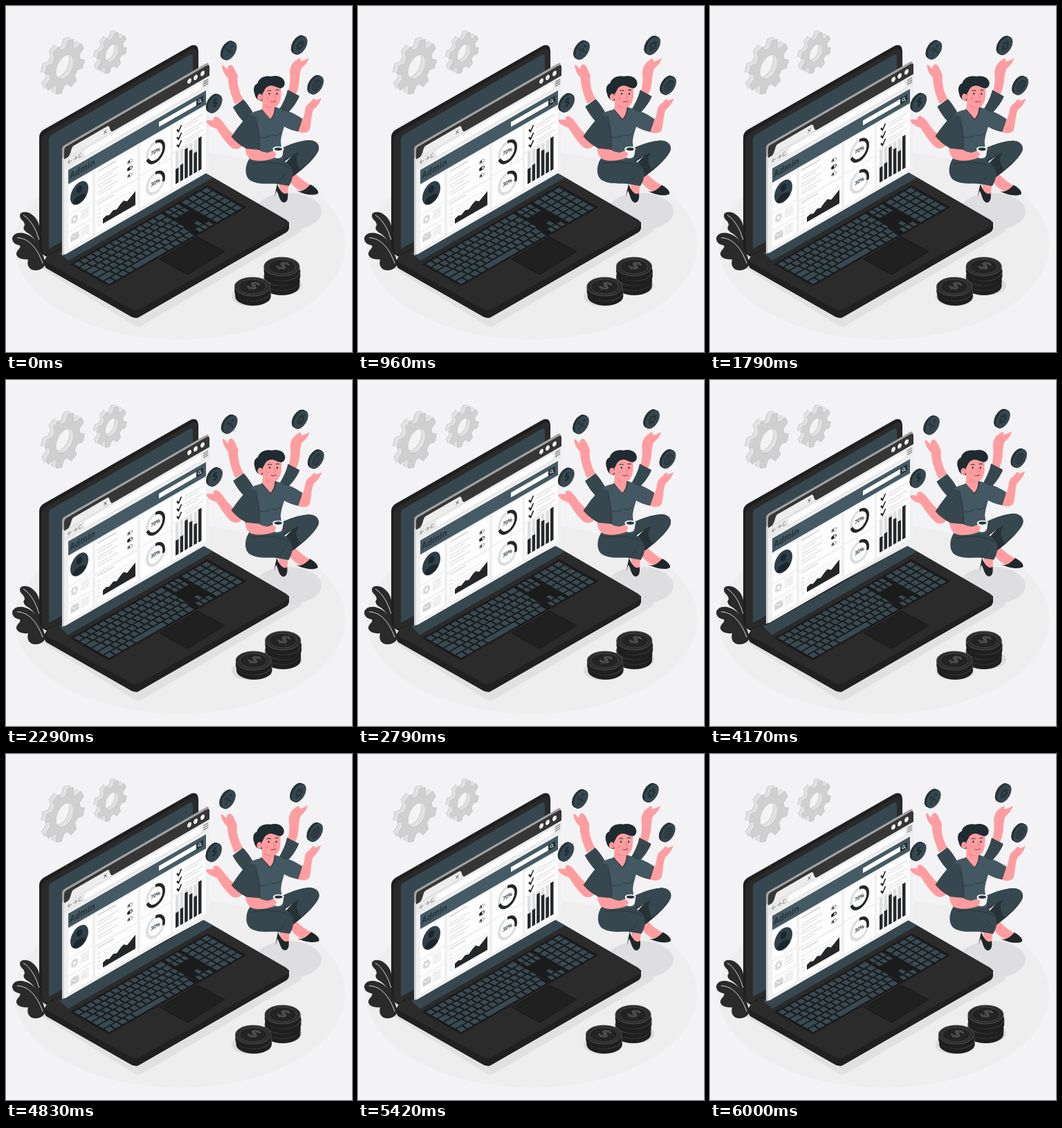
Recreate the animation shown at these times as an HTML page with a canvas. Size 500 by 500 pixels, loop 6040 ms.

```html
<!DOCTYPE html>
<html lang="en">
<head>
<meta charset="utf-8">
<title>Admin dashboard</title>
<style>
html, body { margin: 0; width: 100%; height: 100%; overflow: hidden; background: #f3f3f5; }
canvas { display: block; width: 500px; height: 500px; }
</style>
</head>
<body>
<canvas id="stage" width="500" height="500"></canvas>
<script>
const ctx = document.getElementById('stage').getContext('2d');
const LOOP = 6040, TAU = Math.PI * 2;
const SKIN = '#ff9da0', CLOTH = '#37474f', LIGHT = '#435862', INK = '#263238', BLACK = '#2a2a2a';
const FONT = '"Open Sans", Inter, sans-serif';

function shape(d, fill, line, width = 1) {
  const p = new Path2D(d);
  if (fill) { ctx.fillStyle = fill; ctx.fill(p); }
  if (line) { ctx.strokeStyle = line; ctx.lineWidth = width; ctx.stroke(p); }
}
function oval(x, y, rx, ry, fill, line, width = 1) {
  ctx.beginPath();
  ctx.ellipse(x, y, rx, ry, 0, 0, TAU);
  if (fill) { ctx.fillStyle = fill; ctx.fill(); }
  if (line) { ctx.strokeStyle = line; ctx.lineWidth = width; ctx.stroke(); }
}
function box(x, y, w, h, fill, r = 0) {
  ctx.beginPath();
  ctx.roundRect(x, y, w, h, r);
  ctx.fillStyle = fill;
  ctx.fill();
}
function at(matrix, draw) {
  ctx.save();
  ctx.transform(...matrix);
  draw();
  ctx.restore();
}
// upright plane receding to the right
const wall = (x, y, draw) => at([.866, -.5, 0, 1, x, y], draw);
function label(text, size, fill) {
  ctx.font = `700 ${size}px ${FONT}`;
  ctx.textAlign = 'center';
  ctx.textBaseline = 'middle';
  ctx.fillStyle = fill;
  ctx.fillText(text, 0, 0);
}

// piecewise linear value over evenly spaced keys
function keyed(keys, p) {
  const k = Math.min(Math.max(p, 0), 1) * (keys.length - 1), i = Math.min(Math.floor(k), keys.length - 2);
  return keys[i] + (keys[i + 1] - keys[i]) * (k - i);
}

function cogPath(r, inner, teeth, hole) {
  ctx.beginPath();
  for (let i = 0; i < teeth; i++) {
    const a = (i + .4) / teeth * TAU, s = TAU / teeth;
    [[-.32, inner], [-.19, r], [.19, r], [.32, inner]].forEach(([k, q]) =>
      ctx.lineTo(q * Math.cos(a + k * s), q * Math.sin(a + k * s)));
  }
  ctx.closePath();
  ctx.moveTo(hole, 0);
  ctx.arc(0, 0, hole, 0, TAU, true);
}
function cog(x, y, r, depth) {
  for (let i = depth; i >= 0; i -= .5) {
    at([.8, -.45, 0, 1, x - i, y - i * .5], () => {
      cogPath(r, r * .75, 8, r * .45);
      ctx.fillStyle = i ? '#e2e2e2' : '#d0d0d0';
      ctx.fill('evenodd');
      if (!i || i === depth) {
        ctx.strokeStyle = i ? '#b8b8b8' : '#c2c2c2';
        ctx.lineWidth = .8;
        ctx.stroke();
      }
    });
  }
}

function ground() {
  ctx.fillStyle = '#f3f3f5';
  ctx.fillRect(0, 0, 500, 500);
  oval(251, 346, 239, 136, '#eeeeef');
  shape('M50,378 L186,462 Q192,465 198,461 L424,328 Q430,324 423,320 L290,250Z', '#e1e1e2');
  oval(408, 297, 48, 27, '#dedee0');
  oval(401, 404, 27, 14, '#dcdcdd');
  oval(354, 420, 28, 14, '#dcdcdd');
}

function plant() {
  shape('M20,303 C20,297 30,296 37,301 C44,306 47,312 48,318 L49,354 C44,340 40,334 33,329 C25,325 24,320 27,317 C27,310 20,309 20,303Z', BLACK);
  shape('M9,337 C9,329 19,326 28,329 C39,332 46,342 51,352 L57,371 C56,380 46,384 37,381 C30,377 31,370 32,366 C24,367 14,364 15,357 C17,351 22,350 20,346 C15,345 10,343 9,337Z', BLACK);
  shape('M25,302 C36,309 43,322 48,338 M16,335 C32,335 45,349 53,372', null, '#ededed', .9);
}

function keyPlate() {
  const quad = (s0, s1, t0, t1, fill) => {
    ctx.beginPath();
    [[s0, t0], [s1, t0], [s1, t1], [s0, t1]].forEach(([s, t]) =>
      ctx.lineTo(96 + s * 195 + t * 53, 373 - s * 112 + t * 30));
    ctx.fillStyle = fill;
    ctx.fill();
  };
  quad(-.01, 1.01, -.03, 1.03, '#1b1b1b');
  const gap = .006, row = 1 / 6;
  for (let r = 0; r < 6; r++) {
    const t0 = r * row + .018, t1 = (r + 1) * row - .018;
    const key = (a, b) => quad(a + gap, b - gap, t0, t1, '#384a54');
    const lead = [0, .012, .024, .032, .048, 0][r], step = .046;
    if (r === 5) {
      for (let c = 0; c < 4; c++) key(c * .05, (c + 1) * .05);
      key(.2, .44);
      for (let c = 0; c < 4; c++) key(.44 + c * .05, .49 + c * .05);
    } else {
      key(0, lead + step);
      for (let c = 1; c < 13; c++) key(lead + c * step, lead + (c + 1) * step);
      key(lead + 13 * step, .66);
    }
    for (let c = 0; c < 3; c++)
      if (r < 2 || r === 5 || (r === 4 && c === 1)) key(.672 + c * .037, .709 + c * .037);
    for (let c = 0; c < 4; c++) key(.797 + c * .05, .847 + c * .05);
  }
}

function laptop() {
  shape('M48,190 Q48,183 54,179 L266,58 Q277,53 278,65 L278,240 L64,364 Q48,360 48,346Z', '#1f1f1f');
  shape('M52,193 Q52,187 58,183 L267,63 Q277,58 277,69 L277,240 L60,360 Q52,358 52,352Z', BLACK);
  shape('M62,193 Q62,188 66,186 L265,71 Q270,68 270,74 L270,232 L62,351Z', '#37474f');
  shape('M56,366 L56,374 Q56,378 60,380 L181,449 Q187,452 193,449 L405,327 Q409,324 409,319 L409,312Z', '#202020');
  shape('M187,437 L408,313 L409,319 Q409,324 405,327 L193,449 Q190,451 187,451Z', '#202020');
  shape('M60,361 L285,240 Q289,242 293,244 L405,309 Q412,314 405,319 L193,438 Q187,441 181,438 L60,371 Q54,366 60,361Z', '#2b2b2b');
  shape('M77,357 L286,240 L299,248 L90,368Z', '#37474f');
  keyPlate();
  shape('M222,366 L275,335 Q277,334 279,335 L316,355 L264,387 Q262,388 260,387Z', '#202020', '#171717', 1);
}

function panels() {
  const card = (u, v, w, h) => box(u, v, w, h, '#fdfdfd', 1);
  const rule = (u, v, w, c = '#d9d9da') => box(u, v, w, 1.2, c);

  card(8, 58, 35, 42); card(8, 102, 35, 23); card(8, 127, 35, 23);
  card(47, 58, 61, 46); card(47, 107, 61, 43);
  card(112, 58, 44, 45); card(112, 105, 44, 45);
  card(159, 58, 48, 39); card(159, 99, 48, 51);

  // profile
  oval(24, 78, 13, 15.5, '#2e3f49');
  oval(24, 72.5, 4.2, 5, '#1c262c');
  shape('M14.5,88 C15,79 33,79 33.5,88 C29,93.5 19,93.5 14.5,88Z', '#1c262c');

  at([.866, 0, 0, 1, 17, 112], () => {
    cogPath(6.4, 4.7, 8, 2.6);
    ctx.fillStyle = '#d2d2d3';
    ctx.fill('evenodd');
  });
  box(11.5, 132, 12, 10, '#d2d2d3');
  shape('M11.5,132.5 L17.5,138 L23.5,132.5', null, '#fff', .9);
  for (let i = 0; i < 4; i++) { rule(26, 106 + i * 3.4, 12); rule(26, 131 + i * 3.4, 12); }

  // settings
  rule(50, 62, 27, '#bdbdbd');
  [72, 82, 92].forEach((v, i) => {
    rule(50, v, 30); rule(50, v + 4, 22);
    box(93, v, 8, 5, i === 1 ? '#222' : '#8a8a8a', 2.5);
    if (i !== 1) box(93.8, v + .8, 6.4, 3.4, '#f4f4f4', 1.7);
    oval(i === 1 ? 98.5 : 95.8, v + 2.5, 1.3, 1.7, i === 1 ? '#fff' : '#333');
  });

  // area chart
  rule(50, 109, 24, '#c9c9c9');
  for (let i = 0; i < 5; i++) { rule(50, 118 + i * 5.5, 5); rule(58, 118 + i * 5.5, 47, '#ececec'); }
  shape('M58,142 L58,135 L63,133 L67,135 L73,131 L78,133 L84,128 L88,126 L93,130 L99,126 L105,122 L105,142Z', '#252628');

  // dials
  [[82, .7], [127, .3]].forEach(([v, part]) => at([.866, 0, 0, 1, 134, v], () => {
    oval(0, 0, 14, 14, null, '#dedede', 4.2);
    ctx.beginPath();
    ctx.arc(0, 0, 14, -TAU / 4, -TAU / 4 + part * TAU);
    ctx.strokeStyle = '#242628';
    ctx.lineWidth = 4.2;
    ctx.stroke();
    label(part * 100 + '%', 7.7, CLOTH);
  }));

  // checklist
  [68, 79, 90].forEach(v => {
    shape(`M165,${v} l2.5,4 l4,-7`, null, '#242628', 2);
    rule(176, v - 1, 27); rule(176, v + 3, 21);
  });

  // bars
  [124, 122, 103, 109, 116, 98].forEach((v, i) => {
    const u = 163 + i * 6.6;
    box(u, 99, 4.5, 46, '#dedede');
    box(u, v, 4.5, 145.5 - v, '#26282a');
  });
}

function browser(dy) {
  at([1, -.577, 0, 1, 82, 206 + dy], () => {
    box(-1, -3.5, 212, 156, '#a2a2a2', [4, 4, 0, 2]);
    box(-1, 14, 8, 140, '#d3d3d4', 1);
    box(2, 0, 210, 155, '#ededee', [4, 4, 2, 2]);
    box(2, 0, 210, 17, '#363636', [4, 4, 0, 0]);
    shape('M7,17 C13,15 11,5 16,5 L64,5 C69,5 67,15 72,17Z', '#ededee');
    shape('M59.5,9 l4,5 M63.5,9 l-4,5', null, '#555', .8);
    [183, 192, 202].forEach(u => oval(u, 8, 2.9, 3.5, '#fff'));

    box(2, 17, 210, 15, '#e9e9ea');
    box(31, 20, 169, 9, '#fcfcfc', 3);
    shape('M13,24.5 h-5 m2,-2.5 l-2.3,2.5 l2.3,2.5 M15,24.5 h5 m-2,-2.5 l2.3,2.5 l-2.3,2.5', null, '#8a8a8a', .9);
    ctx.beginPath();
    ctx.arc(25.5, 24.5, 2.5, .4, 5.3);
    ctx.stroke();
    for (let i = 0; i < 3; i++) box(203, 20.5 + i * 3, 7, 1.3, '#777');

    box(2, 32, 210, 123, '#f0f0f1', [0, 0, 2, 2]);
    box(8, 35.5, 199, 20.5, '#455a64');
    at([.866, 0, 0, 1, 28.5, 47], () => label('Admin', 13, INK));
    box(139, 42, 54, 7, '#fff');
    box(193, 41, 10, 9, INK);
    oval(197.5, 45, 1.7, 2, null, '#fff', .8);
    shape('M198.7,46.5 l2,2', null, '#fff', .8);
    panels();
  });
}

function token(x, y, icon) {
  for (let i = 3; i > 0; i -= .5) wall(x - i, y - i * .5, () => oval(0, 0, 11.8, 11.8, INK));
  wall(x, y, () => {
    oval(0, 0, 11.8, 11.8, CLOTH, '#2b3a43', .7);
    ctx.lineCap = 'round';
    icon();
  });
}
const tools = () => shape('M-5,5 L5,-5 M-5,-5 L5,5 M3,-6 L6,-3 M-6,-3 L-3,-6', null, INK, 1.6);
const wheel = () => {
  cogPath(7, 5, 8, 2.6);
  ctx.fillStyle = INK;
  ctx.fill('evenodd');
};
const globe = () => {
  oval(0, 0, 7, 7, null, INK, 1.1);
  oval(0, 0, 3.2, 7, null, INK, .9);
  shape('M-7,0 H7 M0,-7 V7 M-6,-3.5 H6 M-6,3.5 H6', null, INK, .9);
};
const dollar = () => label('$', 16, '#1f2a30');

function arms() {
  shape('M331,142 C326,130 321,117 321,104 C316,100 312,92 312,86 C315,85 317,90 320,92 C320,88 322,85 325,85 C329,86 332,95 335,101 C333,110 337,126 343,135Z', SKIN);
  shape('M328,146 L343,135 C350,142 356,152 360,160 L350,173 C340,166 332,154 328,146Z', CLOTH);
  shape('M408,124 C411,112 411,102 410,97 C410,88 414,81 420,78 C424,74 427,75 425,79 C430,80 433,77 438,75 C436,81 432,86 427,90 C425,94 425,99 424,104 C424,116 420,126 416,134Z', SKIN);
  shape('M407,121 L424,130 C420,141 410,153 403,158 L394,151 C400,141 405,131 407,121Z', CLOTH);
  shape('M289,166 C293,164 297,166 300,165 C299,162 301,160 304,160 C309,162 312,166 315,170 C320,177 326,184 331,187 L343,199 C340,207 331,209 325,204 C316,196 309,184 304,177 C297,175 291,172 289,166Z', SKIN);
  shape('M422,170 C428,168 430,162 432,152 C432,146 436,141 440,139 C443,134 447,132 447,136 C450,136 453,134 456,133 C454,139 450,145 444,150 C441,158 441,170 439,178 C436,185 426,184 418,180Z', SKIN);
  shape('M396,151 C408,150 420,158 428,163 L422,181 C410,179 402,174 396,170Z', LIGHT, INK, .6);
  shape('M351,158 C342,166 332,180 326,189 C331,195 338,201 346,205 L358,180Z', CLOTH, INK, .6);
}

function legs() {
  shape('M394,250 L409,250 L407,273 L396,272Z', SKIN);
  shape('M392,257 C390,265 389,271 388,276 L391,267 C395,274 395,282 401,284 C407,284 408,277 407,270 C403,274 396,269 392,257Z', '#20262a');
  shape('M407,246 L416,240 C424,248 432,255 441,259 L429,268 C420,265 411,259 407,246Z', SKIN);
  shape('M420,267 C428,270 435,263 440,258 C446,261 453,267 451,271 C444,275 430,272 420,267Z', '#20262a');
  shape('M372,222 C390,208 415,196 436,194 C449,193 455,202 451,210 C446,221 428,237 414,247 L398,238 C401,229 408,222 414,216 C402,226 386,236 372,238Z', INK);
  shape('M372,222 C390,208 415,196 436,194 C449,193 455,202 451,210 C446,219 436,228 425,236 C420,226 417,220 424,211 C406,218 390,232 372,236Z', CLOTH);
  shape('M353,219 C346,227 343,245 353,252 C365,259 380,256 391,257 L409,260 C414,252 417,241 411,232 C403,223 394,220 398,216Z', CLOTH);
  shape('M355,228 C373,224 397,226 410,234 M391,256 C397,252 400,248 402,244', null, INK, .9);
}

function torso() {
  shape('M352,157 C360,151 367,151 372,149 L389,146 C398,148 404,152 405,160 C405,170 398,182 397,196 L400,221 L360,225 C361,205 360,192 358,182 C350,175 347,165 352,157Z', LIGHT);
  shape('M371,134 L388,140 L388,147 C388,153 386,159 382,164 C377,159 373,155 370,150Z', SKIN);
  shape('M374,144 C379,149 385,148 388,145 L388,140 L378,139Z', '#ee8488');
  shape('M369,149 C373,154 378,159 382,164 C387,159 389,153 389,146', null, INK, 1);
  shape('M362,187 C369,192 377,191 381,187 M398,182 C393,188 387,188 383,186', null, INK, .8);
  shape('M353,157 C347,166 345,185 346,207 L366,209 C368,190 364,172 362,160Z', CLOTH);
  shape('M361,168 C366,182 367,196 366,209', null, INK, .9);
  shape('M346,206 C346,214 350,222 358,223 C368,225 380,223 389,219 C395,217 397,212 394,209 C388,208 382,211 378,212 C372,211 368,210 366,208Z', SKIN);
  shape('M386,206 L386,214 Q387,220 392,220 Q399,220 400,214 L401,206Z', '#f4f4f4');
  oval(393.5, 206.5, 7.8, 3.4, '#fff', '#d5d5d5', .6);
  oval(393.5, 206.7, 5.8, 2.2, INK);
  shape('M382,211 C387,209 391,211 390,216 C387,220 382,219 380,217Z', SKIN);
}

function head() {
  shape('M367,118 C366,111 378,107 387,109 C395,110 399,116 398,125 C398,136 395,144 388,146 C379,147 370,140 368,131Z', SKIN);
  shape('M360,127 C357,119 359,113 364,111 C366,103 375,99 384,101 C391,99 401,101 403,109 C404,113 402,117 398,118 C392,118 386,112 380,115 C374,117 374,123 371,126 L371,136 C366,137 361,133 360,127Z', '#1f2b31');
  oval(367.5, 131, 3.8, 4.8, SKIN);
  shape('M366,129 Q369,130 369,133', null, '#e0787c', .8);
  oval(381, 126, 1.1, 1.6, INK);
  oval(392, 126, 1.1, 1.6, INK);
  shape('M378,122 Q381,120 384,122 M390,121 Q392,119.5 395,121', null, INK, 1);
  shape('M388,126 L390,132 L387,132.5', null, '#e0787c', .9);
  shape('M383,137 Q387,139 391,136', null, '#8d3f46', 1);
  oval(378, 133, 2.6, 1.8, '#ff8a90');
}

function woman(angle) {
  ctx.save();
  ctx.translate(386, 180);
  ctx.rotate(angle);
  ctx.translate(-386, -180);
  arms();
  legs();
  torso();
  at([1, 0, 0, 1, -.5, .8], head);
  token(323, 65, tools);
  token(425, 57, wheel);
  token(448.5, 114.5, globe);
  token(302, 141.5, dollar);
  ctx.restore();
}

function pile(x, y, count) {
  for (let i = count - 1; i >= 0; i--) {
    const cx = x + (i % 2 ? 1 : 0) - (i === 3 ? 1 : 0), cy = y + i * 7;
    ctx.beginPath();
    ctx.ellipse(cx, cy + 7, 25.8, 13.6, 0, 0, Math.PI);
    ctx.ellipse(cx, cy, 25.8, 13.6, 0, Math.PI, TAU);
    ctx.fillStyle = '#1f1f1f';
    ctx.fill();
    oval(cx, cy, 25.5, 13.5, '#2c2c2c', '#5d5d5d', .8);
  }
  oval(x, y, 20, 10.5, '#232323', '#444', 1);
  at([.866, .5, -.866, .5, x, y], () => {
    ctx.rotate(-.12);
    label('$', 23, '#505050');
  });
}

function draw(t) {
  const sway = keyed([0, 1, 0, -1, 0], t / 6000) * .0185;
  const lift = t < 1000 ? 0 : -8.4 * keyed([0, 1, 0], (t - 1000) / 6000);
  const shake = keyed([0, -1, 1.5, -3, 3, -.5, -1.1, -3, 1.2, -1, 0], t / LOOP);
  ground();
  cog(85, 88, 36, 6);
  cog(153, 68, 27, 5);
  plant();
  laptop();
  browser(lift);
  woman(sway);
  ctx.save();
  ctx.translate(shake, 0);
  pile(398.5, 376.5, 4);
  pile(356, 405.5, 2);
  ctx.restore();
}

const start = performance.now();
function tick() {
  draw((performance.now() - start) % LOOP);
  requestAnimationFrame(tick);
}
tick();
</script>
</body>
</html>
```
